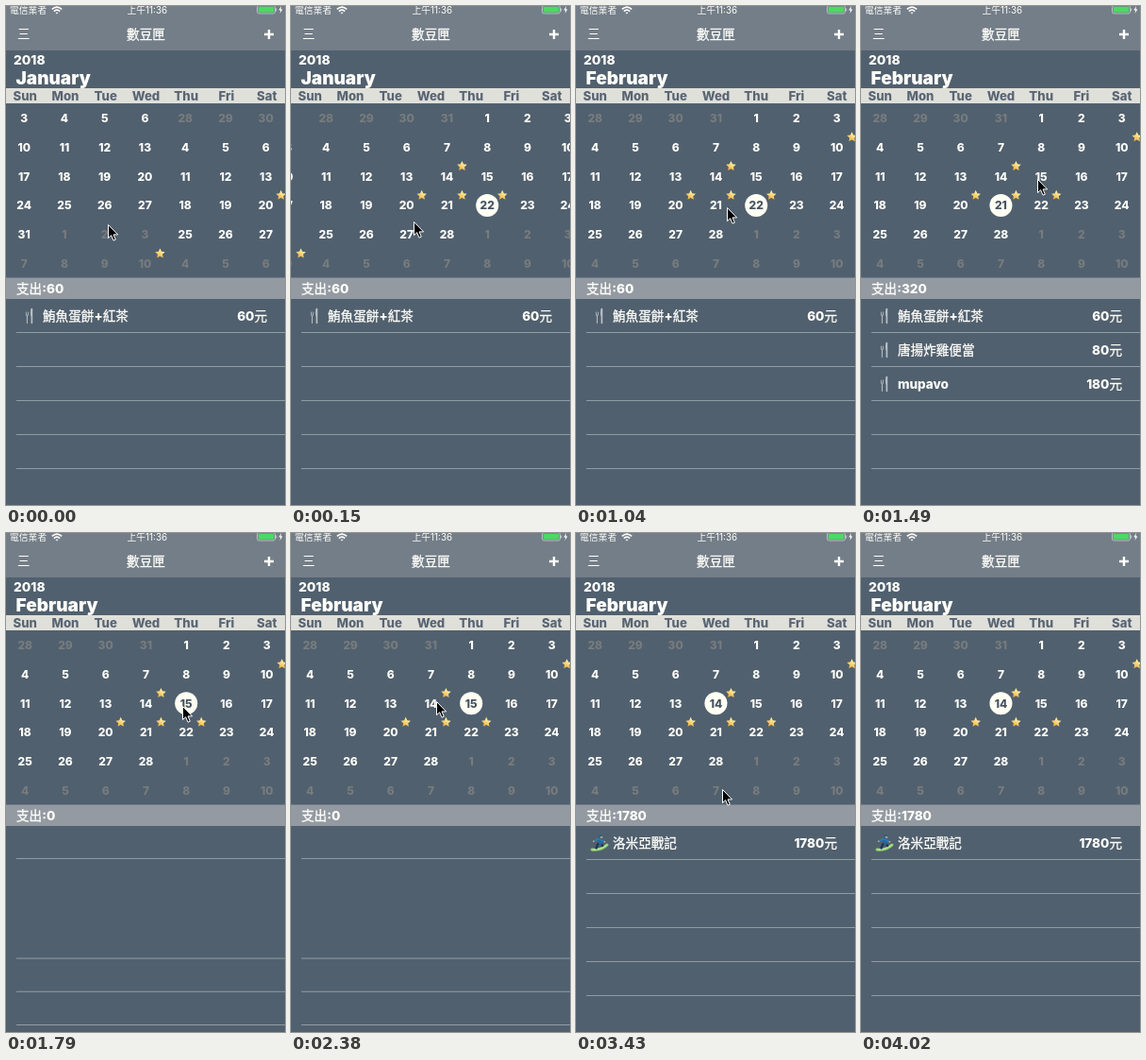
Write an HTML page that moves like this. It is 296x528 px and loops after 4.52 s.

```html
<!DOCTYPE html>
<html lang="zh-Hant">
<head>
<meta charset="utf-8">
<title>Expense calendar</title>
<style>
  html, body { margin: 0; width: 100%; height: 100%; overflow: hidden; background: #51606e; }
  svg { display: block; width: 296px; height: 528px; }
  text { font-family: Inter, "Noto Sans CJK TC", "Noto Sans CJK", sans-serif; fill: #fffffa; }
  .mid { text-anchor: middle; }
  .end { text-anchor: end; }
  .status { font-size: 9.8px; }
  .han { font-size: 13.6px; stroke: #fffffa; stroke-width: .3; }
  .latin { font-size: 13.5px; font-weight: 800; stroke: none; }
  .week { font-size: 13.2px; font-weight: 800; fill: #596574; }
  .day { font-size: 12px; font-weight: 800; text-anchor: middle; }
  .out { fill: #777c7f; }
  .picked { fill: #445260; }
  .rule { stroke: #919ca5; stroke-width: 1; }
</style>
</head>
<body>
<svg viewBox="0 0 296 528">
  <defs>
    <linearGradient id="gold" x1=".8" y1="0" x2=".2" y2="1">
      <stop offset=".2" stop-color="#fff3a6"/>
      <stop offset="1" stop-color="#f0a832"/>
    </linearGradient>
    <polygon id="star" fill="url(#gold)"/>
    <g id="meal" fill="none" stroke="#bcc4ca" stroke-linecap="round">
      <path d="M-3.6-4v3M-1.6-4v3" stroke-width=".8"/>
      <path d="M-3.6-1q1 1.6 2 0M-2.6 0V7.5" stroke-width="1"/>
      <path d="M2.4-7.5V7.5" stroke-width="1.6"/>
      <path d="M2-7.5Q.2-3 2 .5" fill="#aab3bb" stroke-width=".6"/>
    </g>
    <g id="fun" fill="none" stroke-linecap="round" stroke-linejoin="round">
      <path d="M-8 7Q2 8 8 2" stroke="#8ed36c" stroke-width="3"/>
      <path d="M-7 7Q2 7 7.5 2" stroke="#dff0c0" stroke-width=".8"/>
      <path d="M-3.5 5.5-2 1.5 1-.5 3 3" stroke="#20384f" stroke-width="2.4"/>
      <path d="M0-4 1 0" stroke="#24699f" stroke-width="4"/>
      <path d="M-6-2-1-4.5 5-1.5" stroke="#2b7db8" stroke-width="1.8"/>
      <circle cx="1" cy="-6.5" r="2.2" fill="#285f8e"/>
      <path d="M1.2-6h1.5M-6.5-1.8h.3M5.3-1.2h.3" stroke="#e3b462" stroke-width="1.5"/>
    </g>
  </defs>

  <rect width="296" height="528" fill="#51606e"/>
  <rect width="296" height="47" fill="#747e88"/>

  <text class="status" x="4" y="7.8">電信業者</text>
  <g fill="none" stroke="#fff" stroke-width="1.6">
    <path d="M48.8 3.4Q54 -1.2 59.2 3.4M50.8 5.6Q54 2.8 57.2 5.6"/>
    <path d="M52.4 6.8H55.6L54 8.6Z" fill="#fff" stroke="none"/>
  </g>
  <text class="status mid" x="149.8" y="7.8">上午11:36</text>
  <rect x="266.5" y="-.5" width="19" height="8.5" rx="2" fill="none" stroke="#c9ced2" stroke-width=".8"/>
  <rect x="267.7" y=".7" width="16.6" height="6.1" rx="1" fill="#4cd964"/>
  <path d="M286.6 2.5v3" stroke="#c9ced2"/>
  <path d="M292 0 289.4 4.6H291.3L290.5 8 293.4 3.4H291.5Z" fill="#fff"/>

  <text x="12" y="34" font-size="13.5">三</text>
  <text class="han mid" x="148.5" y="34.5">數豆匣</text>
  <path d="M274 30h10M279 25v10" stroke="#fffffa" stroke-width="2.4"/>

  <text x="8" y="62" font-size="13.8" font-weight="800">2018</text>
  <text id="month" x="10.5" y="83" font-size="19" font-weight="900"></text>
  <rect y="87" width="296" height="16" fill="#dfe0da"/>
  <g id="week"></g>
  <g id="days"></g>
  <rect y="287.5" width="296" height="22.5" fill="#949aa2"/>
  <g id="list"></g>
  <path id="cursor" fill="#000" stroke="#fff" stroke-linejoin="round"
    d="M.5.5V14.6L3.7 11.7 6 17.2 8.3 16.2 6 10.9H10.6Z"/>
</svg>
<script>
const LOOP = 4520, BEAT = 149, COL = 42.75, ROW = 30.8, PAGE = COL * 7;
const $ = id => document.getElementById(id);
const starred = [10, 14, 20, 21, 22];
const meals = [["鮪魚蛋餅+紅茶", 60], ["唐揚炸雞便當", 80], ["mupavo", 180]];

// February days in the order they are tapped; beats count from the loop start
const taps = [
  { beat: 0, day: 22, icon: "meal", items: meals.slice(0, 1) },
  { beat: 8, day: 21, icon: "meal", items: meals },
  { beat: 12, day: 15, items: [] },
  { beat: 18, day: 14, icon: "fun", items: [["洛米亞戰記", 1780]] }
];

// pointer strokes, each starting where the one before ended
const origin = [108, 231];
const strokes = [
  { beat: 0, length: 3, to: [174, 222], power: 1 },
  { beat: 3, length: 2, to: [131, 206] },
  { beat: 5, length: 2, to: [160, 213] },
  { beat: 8, length: 2, to: [187, 183], power: 1 },
  { beat: 12, length: 4, to: [154, 178] },
  { beat: 22, length: 1, to: [155, 271] },
  { beat: 23, length: 3, to: [277, 523] }
];
const LAST_BEAT = 27;

function pointer(beat) {
  return strokes.reduce((from, { beat: start, length, to, power = 2.5 }) => {
    const u = Math.min(1, Math.max(0, (beat - start) / length));
    const eased = 1 - (1 - u) ** power;
    return from.map((v, i) => v + (to[i] - v) * eased);
  }, origin);
}

function monthPage(month, left, picked) {
  const lead = new Date(2018, month, 1).getDay();
  let out = "";
  for (let i = 0; i < 42; i++) {
    const date = new Date(2018, month, 1 - lead + i), day = date.getDate();
    const x = left + 20.2 + (i % 7) * COL, y = 118.65 + Math.floor(i / 7) * ROW;
    const february = date.getMonth() === 1, inside = date.getMonth() === month;
    const on = february && inside && day === picked;
    if (on) out += `<circle cx="${x}" cy="${y}" r="12" fill="#fffff4"/>`;
    out += `<text class="day ${on ? "picked" : inside ? "" : "out"}" x="${x}" y="${y + 4.3}">${day}</text>`;
    if (february && starred.includes(day)) out += `<use href="#star" x="${x + 16}" y="${y - 10.7}"/>`;
  }
  return out;
}

// Latin letters and digits are heavier than the Han text around them
function label(text, x, y, anchor = "") {
  const mixed = text.replace(/[\w:+]+/g, '<tspan class="latin">$&</tspan>');
  return `<text class="han ${anchor}" x="${x}" y="${y}">${mixed}</text>`;
}

function expenseList({ icon, items }) {
  const total = items.reduce((sum, item) => sum + item[1], 0);
  const [top, pitch, slots] = items.length ? [345.5, 36, [0, 1, 2, 3, 4]] : [344.5, 35.2, [0, 3, 4, 5]];
  return label(`支出:${total}`, 11, 303.8) +
    slots.map(i => `<path class="rule" d="M11 ${top + i * pitch}H296"/>`).join("") +
    items.map(([name, cost], i) => {
      const y = 328 + i * 36;
      return `<use href="#${icon}" x="25" y="${y}"/>` +
        label(name, 39, y + 4.5) + label(`${cost}元`, 277, y + 4.5, "end");
    }).join("");
}

function show(beat) {
  const tap = taps.findLast(t => t.beat <= beat);
  const rest = beat < 3 ? 170 * 0.1 ** beat : 0; // distance left to February
  const [x, y] = pointer(beat);
  $("month").textContent = rest ? "January" : "February";
  $("days").innerHTML = (rest ? monthPage(0, rest - PAGE, tap.day) : "") + monthPage(1, rest, tap.day);
  $("list").innerHTML = expenseList(tap);
  $("cursor").setAttribute("transform", `translate(${Math.round(x)} ${Math.round(y)})`);
  $("cursor").style.display = beat < LAST_BEAT ? "" : "none";
}

$("star").setAttribute("points", Array.from({ length: 10 }, (_, i) => {
  const r = i % 2 ? 2.7 : 5.5, a = i * Math.PI / 5;
  return `${r * Math.sin(a)},${-r * Math.cos(a)}`;
}).join(" "));

$("week").innerHTML = ["Sun", "Mon", "Tue", "Wed", "Thu", "Fri", "Sat"]
  .map((name, i) => `<text class="week mid" x="${20.2 + i * COL}" y="99.8">${name}</text>`).join("");

let current;
function tick() {
  const time = performance.now() % LOOP;
  const beat = Math.min(LAST_BEAT, Math.floor((time + 6) / BEAT));
  if (beat !== current) show(current = beat);
  requestAnimationFrame(tick);
}
tick();
</script>
</body>
</html>
```
